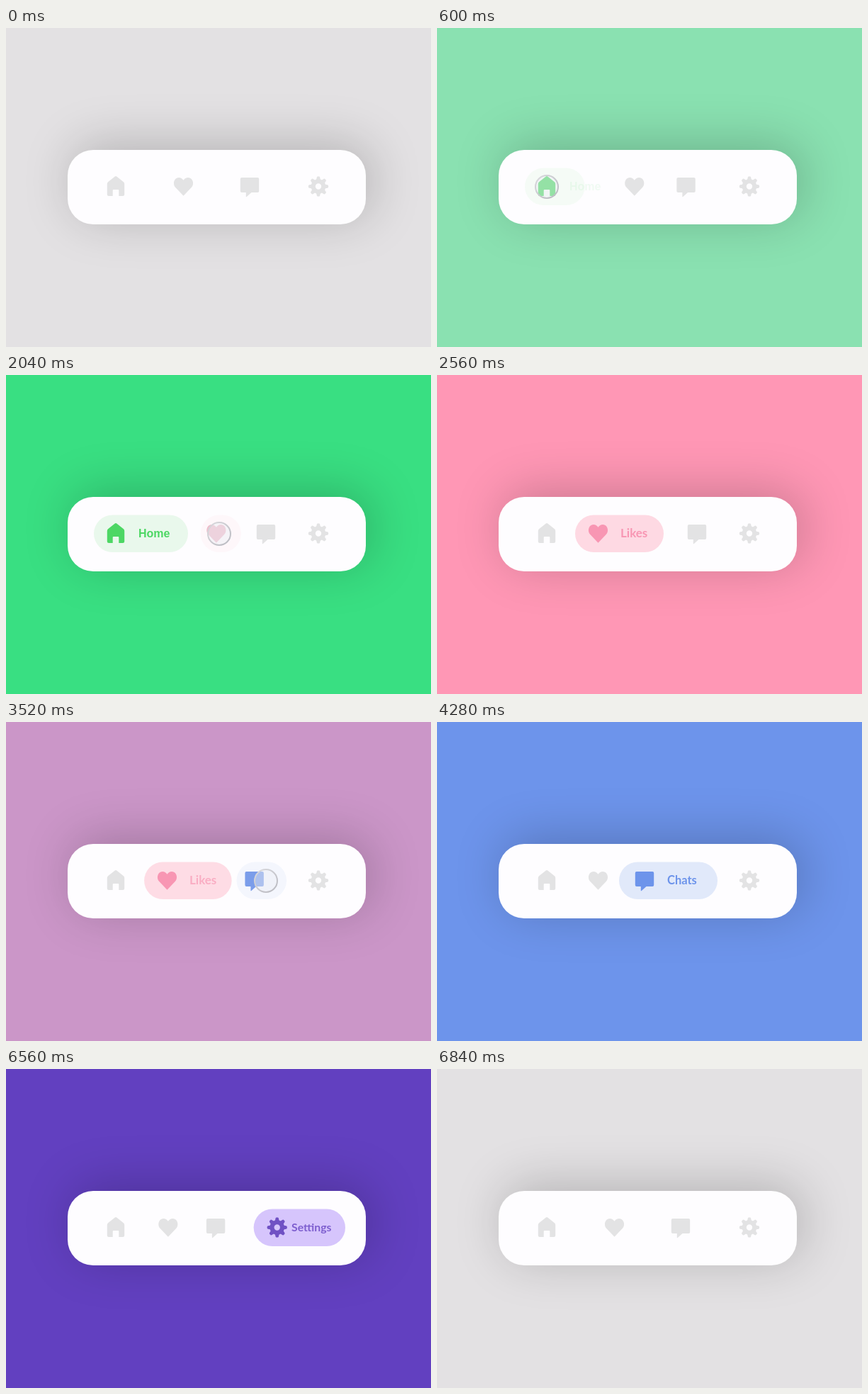
Write an HTML page that moves like this. It is 600 by 450 pixels and loops after 7 s.

```html
<!DOCTYPE html>
<html lang="en">
<head>
<meta charset="utf-8">
<title>Tab bar</title>
<style>
  html, body { margin: 0; width: 100%; height: 100%; overflow: hidden; }
  #stage { position: relative; width: 600px; height: 450px; overflow: hidden; background: rgb(227, 225, 227); }
  #card {
    position: absolute; left: 86.5px; top: 172px; width: 421.5px; height: 104.5px;
    border-radius: 36px; background: #fefdff;
    box-shadow: 8px -8px 70px rgba(0, 0, 0, .21);
  }
  svg { position: absolute; left: 0; top: 0; }
  text { font: bold 16px Lato, sans-serif; }
</style>
</head>
<body>
<div id="stage">
  <div id="card"></div>
  <svg id="scene" width="600" height="450" viewBox="0 0 600 450">
    <defs>
      <linearGradient id="rim" x1="0" y1="0" x2="1" y2="1">
        <stop offset="0" stop-color="#dadade"/>
        <stop offset="1" stop-color="#b9b9c0"/>
      </linearGradient>
    </defs>
  </svg>
</div>
<script>
const LOOP = 7000, MOVE = 260, RESET = 6520;
const GREY = [227, 227, 228], IDLE = [227, 225, 227];

const gearPath = () => {
  const points = Array.from({ length: 160 }, (_, i) => {
    const a = i * Math.PI / 80;
    const r = 12.2 + 2 * Math.tanh(2 * Math.cos(8 * a));
    return (r * Math.cos(a)).toFixed(2) + ' ' + (r * Math.sin(a)).toFixed(2);
  });
  return `M${points.join('L')}ZM4.2 0A4.2 4.2 0 1 0 -4.2 0A4.2 4.2 0 1 0 4.2 0Z`;
};

// Pill extents are [left, right]: when it appears, when open, when it leaves.
const tabs = [
  { label: 'Home', textX: 187, font: 'bold 16px "Liberation Sans", sans-serif', on: 500, off: 2020,
    color: [77, 215, 100], tint: [233, 248, 236], bg: [52, 225, 129],
    from: [124, 185], open: [124, 257], to: [124, 185], touch: [155, 224],
    icon: 'M-1.6 -13.8Q0 -15 1.6 -13.8L10.7 -6.4Q12.2 -5.2 12.2 -3.4V11Q12.2 13.5 9.7 13.5H4.3V5.6Q4.3 4.6 3.3 4.6H-3.3Q-4.3 4.6 -4.3 5.6V13.5H-9.7Q-12.2 13.5 -12.2 11V-3.4Q-12.2 -5.2 -10.7 -6.4Z' },
  { label: 'Likes', textX: 259, font: 'bold 17px Lato, sans-serif', on: 2020, off: 3440,
    color: [248, 150, 179], tint: [254, 217, 227], bg: [255, 151, 181],
    from: [276, 332], open: [195, 320], to: [199, 257], touch: [301, 224],
    icon: 'M0 13.2L-11.2 1.6C-15 -2.6 -14 -9 -10 -11.5C-6.5 -13.6 -2.4 -12.4 0 -8.8C2.4 -12.4 6.5 -13.6 10 -11.5C14 -9 15 -2.6 11.2 1.6Z' },
  { label: 'Chats', textX: 325, font: 'bold 16.5px Lato, sans-serif', on: 3440, off: 4980,
    color: [109, 148, 235], tint: [225, 233, 250], bg: [109, 148, 235],
    from: [345, 396], open: [257, 396], to: [257, 316], touch: [367, 224],
    icon: 'M-11.2 -12.5H11.2Q13.2 -12.5 13.2 -10.5V6.6Q13.2 8.6 11.2 8.6H2.5L-4.2 14.6Q-5.2 15.3 -5.2 14.2V8.6H-11.2Q-13.2 8.6 -13.2 6.6V-10.5Q-13.2 -12.5 -11.2 -12.5Z' },
  { label: 'Settings', textX: 403, font: 'bold 15.8px Lato, sans-serif', on: 4980, off: RESET,
    color: [92, 56, 190], tint: [206, 186, 252], bg: [92, 56, 190],
    from: [412, 479], open: [344, 479], to: [412, 479], touch: [441, 223],
    icon: gearPath() }
];

// Icon centres: idle, then with each tab open.
const layouts = [
  [155, 250.5, 344, 441],
  [155, 298, 367, 441],
  [155, 227.5, 367, 441],
  [155, 227.5, 293, 441],
  [155, 227.5, 293, 379]
];
const steps = [...tabs.map(tab => tab.on), RESET];

const stage = document.getElementById('stage');
const scene = document.getElementById('scene');
const make = (name, attrs) => {
  const el = document.createElementNS(scene.namespaceURI, name);
  set(el, attrs);
  return scene.appendChild(el);
};
function set(el, attrs) {
  for (const key in attrs) el.setAttribute(key, attrs[key]);
}
const ramp = (t, start, span) => Math.min(1, Math.max(0, (t - start) / span));
const smooth = x => .5 - .5 * Math.cos(Math.PI * x);
const mix = (a, b, k) => a + (b - a) * k;
const blend = (a, b, k) => `rgb(${a.map((v, i) => Math.round(mix(v, b[i], k)))})`;

for (const tab of tabs) tab.pill = make('rect', { y: 197.5, height: 52.5, rx: 26.25, fill: blend(tab.tint, tab.tint, 0) });
for (const tab of tabs) {
  tab.shape = make('path', { d: tab.icon, 'fill-rule': 'evenodd' });
  tab.text = make('text', { x: tab.textX, y: 228.8, fill: blend(tab.color, tab.color, 0) });
  tab.text.textContent = tab.label;
  tab.text.style.font = tab.font;
}
const touch = make('circle', { fill: '#ebeef4', stroke: 'url(#rim)', 'stroke-width': 2 });

function drawBackground(t, step) {
  const colors = [IDLE, ...tabs.map(tab => tab.bg), IDLE];
  const span = step === 5 ? 300 : 200;
  const k = step ? smooth(ramp(t, steps[step - 1], span)) : 0;
  stage.style.background = blend(colors[Math.max(0, step - 1)], colors[step], k);
}

function iconX(i, t, step) {
  if (!step) return layouts[0][i];
  const span = step === 1 && i === 1 ? 180 : MOVE;
  return mix(layouts[step - 1][i], layouts[step % 5][i], smooth(ramp(t, steps[step - 1], span)));
}

function drawTab(tab, i, t, step) {
  const { on, off } = tab;
  const last = off === RESET;
  const grow = smooth(ramp(t, on, MOVE));
  const shrink = smooth(ramp(t, off + (last ? 0 : 60), 220));
  const [left, right] = [0, 1].map(s => mix(mix(tab.from[s], tab.open[s], grow), tab.to[s], shrink));
  const pillAlpha = ramp(t, on - 30, 290) * (1 - ramp(t, off + (last ? 0 : 60), 230));
  const tone = ramp(t, on - 60, 160) * (1 - ramp(t, off + (last ? 0 : 180), 280));
  const textAlpha = ramp(t, on + 90, 150) * (1 - ramp(t, off + (last ? 0 : 30), 150));
  set(tab.pill, { x: left, width: right - left, opacity: pillAlpha });
  set(tab.shape, { transform: `translate(${iconX(i, t, step)} 223.5)`, fill: blend(GREY, tab.color, tone) });
  set(tab.text, { opacity: textAlpha });
}

function drawTouch(t) {
  const tab = tabs.find(({ on }) => t > on - 120 && t < on + 340);
  if (!tab) return set(touch, { opacity: 0 });
  const age = t - tab.on;
  const press = smooth(ramp(age, -120, 100));
  const release = smooth(ramp(age, 120, 140));
  set(touch, {
    cx: tab.touch[0], cy: tab.touch[1],
    r: 22.5 - 6.5 * press + 6.5 * release,
    'fill-opacity': .45 * (1 - release),
    opacity: press * (1 - ramp(age, 220, 110))
  });
}

function draw(now) {
  const t = now % LOOP;
  const step = steps.filter(time => time <= t).length;
  drawBackground(t, step);
  tabs.forEach((tab, i) => drawTab(tab, i, t, step));
  drawTouch(t);
}

const start = performance.now();
const tick = () => {
  draw(performance.now() - start);
  requestAnimationFrame(tick);
};
tick();
</script>
</body>
</html>
```
